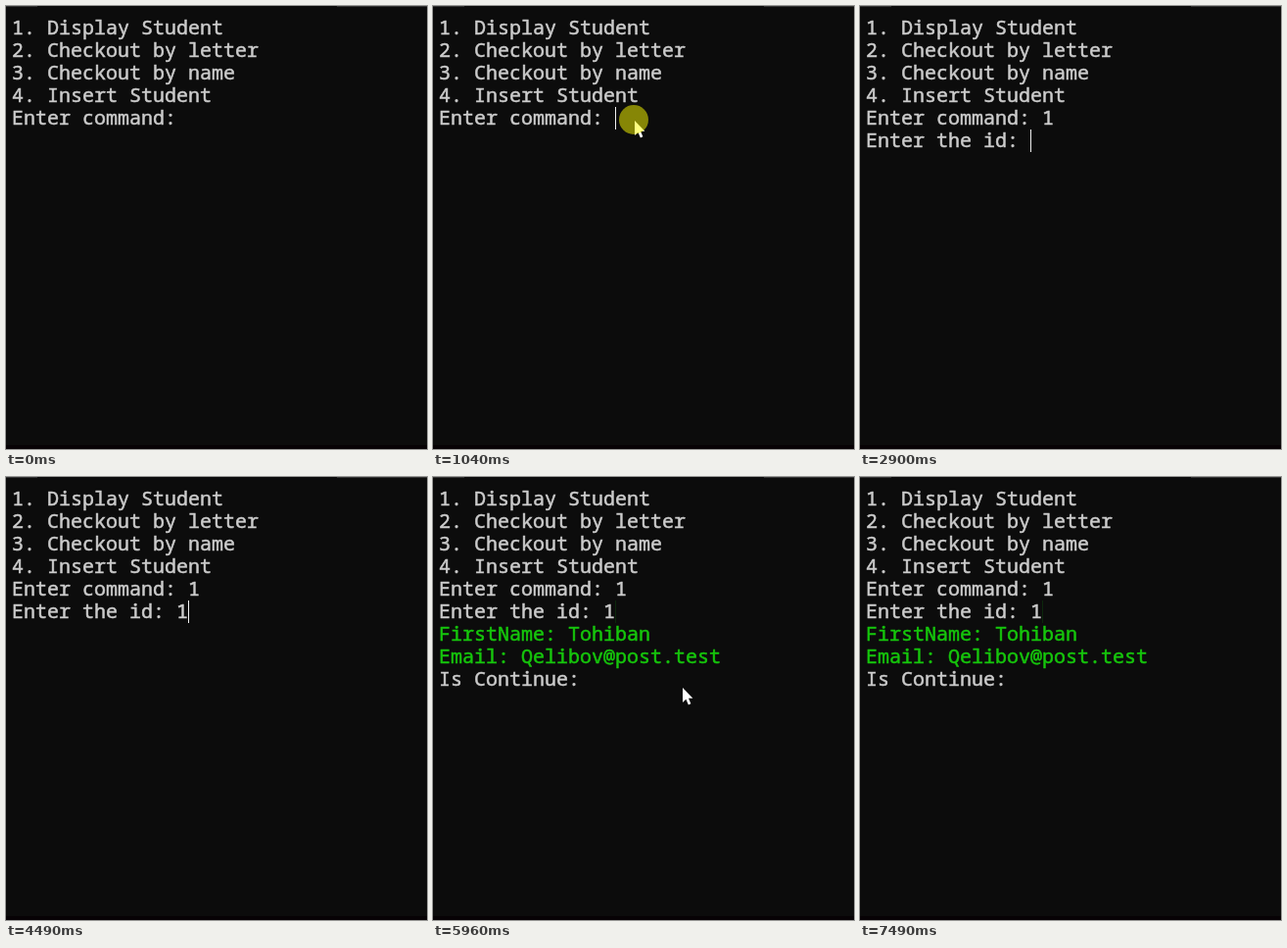
An HTML page that plays this animation: 430 px wide and 452 px high, repeating every 7.69 s.

```html
<!DOCTYPE html>
<html lang="en">
<head>
<meta charset="utf-8">
<title>Student console</title>
<style>
  html, body { margin: 0; width: 100%; height: 100%; overflow: hidden; background: #0c0c0c; }
  svg { display: block; width: 430px; height: 452px; }
  text {
    font: 500 20px "Noto Sans Mono", "DejaVu Sans Mono", monospace;
    font-variant-ligatures: none;
    white-space: pre;
    fill: #ccc;
    stroke: #ccc;
    stroke-width: .5px;
  }
  .out { fill: #16c60c; stroke: #16c60c; }
</style>
</head>
<body>
<svg id="stage" viewBox="0 0 430 452">
  <rect width="430" height="452" fill="#0c0c0c"/>
  <path d="M0 .5H32M338 .5H430" stroke="#333"/>
  <rect y="448" width="430" height="4" fill="#070205"/>
  <g id="lines"></g>
  <rect id="trace" x="186" y="126" width="1" height="23" fill="#0c280c"/>
  <rect id="caret" width="1" height="23" fill="#f0f0f0"/>
  <path id="mouse" d="M0 0V15L3.4 11.8L5.9 17.4L8.4 16.3L6 10.8H10.4Z" fill="#fff"/>
  <circle id="click" cx="205" cy="116" r="15" fill="#ff0" fill-opacity=".5"/>
</svg>
<script>
const LOOP = 7690, COL = 12, ROW = 23, LEFT = 6, TOP = 11;
const $ = id => document.getElementById(id);

// Hold each state until the next one: steps are [ms, keyframe].
function hold(el, steps) {
  const frames = steps.map(([ms, props]) => ({ ...props, offset: ms / LOOP, easing: 'step-end' }));
  frames.push({ ...steps[steps.length - 1][1], offset: 1 });
  el.animate(frames, { duration: LOOP, iterations: Infinity });
}

const hidden = { opacity: 0, transform: 'translate(0px, 0px)' };
const at = (x, y) => ({ opacity: 1, transform: `translate(${x}px, ${y}px)` });
const cell = (col, row) => at(LEFT + col * COL, TOP + row * ROW);

function show(el, from, to = LOOP) {
  const steps = [[0, { opacity: 0 }], [from, { opacity: 1 }]];
  if (to < LOOP) steps.push([to, { opacity: 0 }]);
  hold(el, steps);
}

// Text: row, column, string, time of appearance, class
[
  [0, 0, '1. Display Student'],
  [1, 0, '2. Checkout by letter'],
  [2, 0, '3. Checkout by name'],
  [3, 0, '4. Insert Student'],
  [4, 0, 'Enter command:'],
  [4, 15, '1', 2100],
  [5, 0, 'Enter the id:', 2900],
  [5, 14, '1', 4490],
  [6, 0, 'FirstName: Tohiban', 4960, 'out'],
  [7, 0, 'Email: Qelibov@post.test', 4960, 'out'],
  [8, 0, 'Is Continue:', 4960]
].forEach(([row, col, str, from, cls]) => {
  const t = document.createElementNS('http://www.w3.org/2000/svg', 'text');
  t.setAttribute('x', LEFT + col * COL);
  t.setAttribute('y', TOP + 18 + row * ROW);
  if (cls) t.setAttribute('class', cls);
  t.textContent = str;
  $('lines').append(t);
  if (from) show(t, from);
});

show($('trace'), 4960);
show($('click'), 1040, 1240);

hold($('caret'), [
  [0, hidden], [1040, cell(15, 4)], [1570, hidden], [2100, cell(16, 4)],
  [2900, cell(14, 5)], [3630, hidden], [4160, cell(14, 5)], [4490, cell(15, 5)],
  [4960, cell(13, 8)], [5630, hidden], [6160, cell(13, 8)], [6750, hidden],
  [7290, cell(13, 8)], [7490, hidden]
]);

hold($('mouse'), [
  [0, hidden],
  [370, at(284, 223)], [440, at(268, 200)], [510, at(246, 170)],
  [580, at(226, 143)], [640, at(211, 125)], [710, at(206, 117)],
  [2170, hidden],
  [5830, at(212, 153)], [5900, at(225, 170)], [5960, at(255, 215)],
  [6030, at(300, 280)], [6100, at(345, 340)], [6160, at(378, 385)],
  [6230, at(393, 405)], [6290, at(399, 413)], [6350, at(405, 422)],
  [6420, at(412, 430)], [6490, at(415, 436)], [6560, at(408, 442)],
  [6620, at(398, 446)], [6750, hidden]
]);
</script>
</body>
</html>
```
